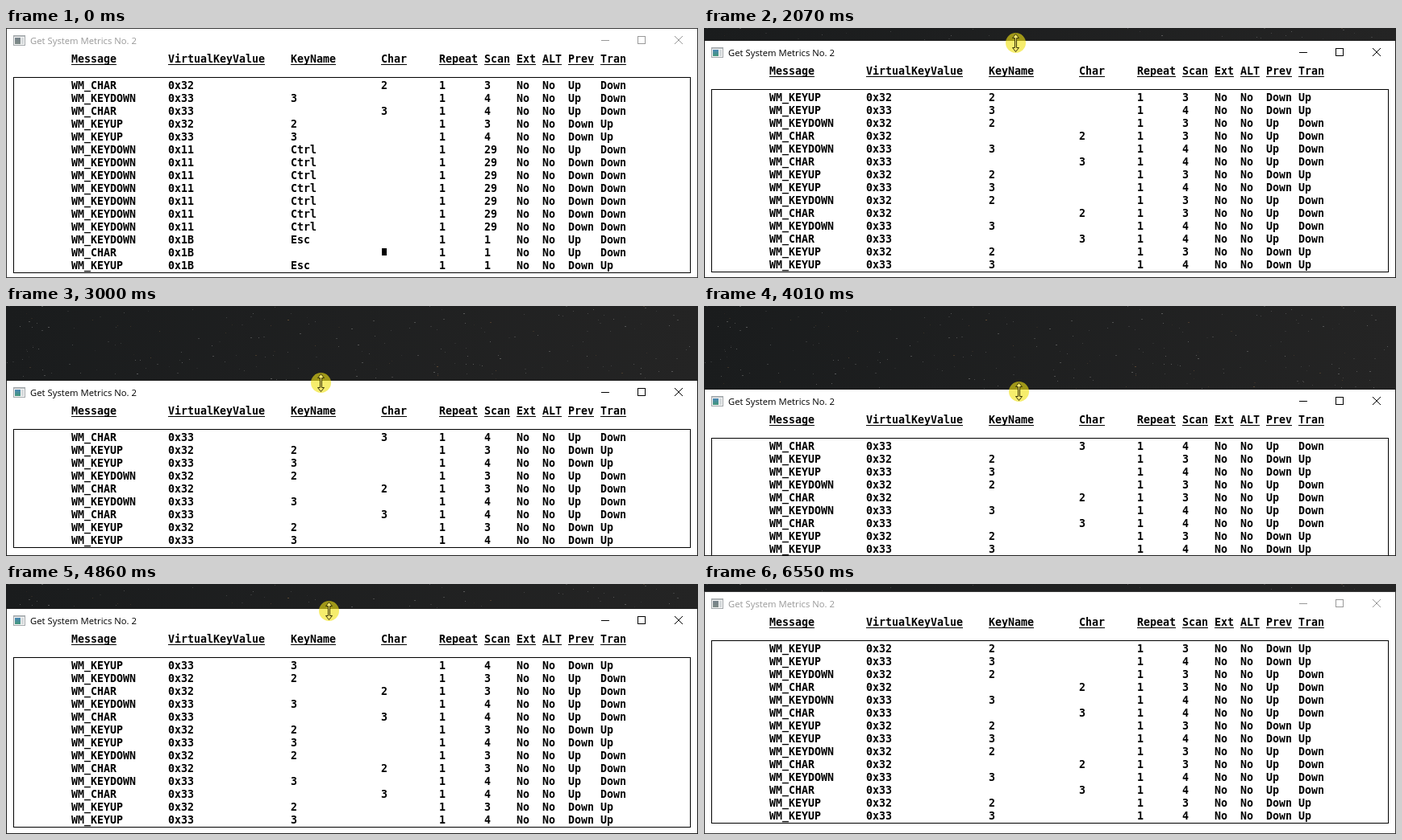
An HTML page with a canvas for the animation above (6.63 s loop, 858x311 px).

```html
<!DOCTYPE html>
<html lang="en">
<head>
<meta charset="utf-8">
<title>Key message viewer</title>
<style>
  html, body { margin: 0; width: 100%; height: 100%; overflow: hidden; background: #1e1f20; }
  canvas { display: block; }
</style>
</head>
<body>
<canvas id="stage" width="858" height="311"></canvas>
<script>
const W = 858, H = 311, LOOP = 6630;
const ctx = document.getElementById('stage').getContext('2d');
const MONO = 'bold 13.29px "DejaVu Sans Mono", monospace';
const UI = '11.3px "Open Sans", sans-serif';

// Message log: d = key down, r = auto-repeat, c = char, u = key up
const KEYS = {
  1: { code: '0x31', name: '1', scan: 2 },
  2: { code: '0x32', name: '2', scan: 3 },
  3: { code: '0x33', name: '3', scan: 4 },
  C: { code: '0x11', name: 'Ctrl', scan: 29 },
  E: { code: '0x1B', name: 'Esc', scan: 1 }
};
const KINDS = {
  d: ['WM_KEYDOWN', 'Up', 'Down'],
  r: ['WM_KEYDOWN', 'Down', 'Down'],
  c: ['WM_CHAR', 'Up', 'Down'],
  u: ['WM_KEYUP', 'Down', 'Up']
};
const LOG = [
  [0, 'c2 d3 c3 u2 u3 dC rC rC rC rC rC rC dE cE uE'],
  [460, 'd1 c1'], [540, 'u1 d3 c3'], [620, 'u3'], [700, 'd2 c2'], [770, 'd1 c1'],
  [940, 'u1'], [1010, 'd3 c3'], [1080, 'u2'], [1160, 'u3'], [1230, 'd2 c2'],
  [1390, 'd3 c3'], [1460, 'u2'], [1540, 'u3'], [1620, 'd2 c2'], [1690, 'd3 c3'],
  [1770, 'u2 u3']
].flatMap(([time, list]) => list.split(' ').map(item => ({ time, item })));

// Header columns: label and position in characters
const COLUMNS = [
  ['Message', 0], ['VirtualKeyValue', 15], ['KeyName', 34], ['Char', 48], ['Repeat', 57],
  ['Scan', 64], ['Ext', 69], ['ALT', 73], ['Prev', 77], ['Tran', 82]
];
const columnX = i => 81 + COLUMNS[i][1] * 8;

// Poses: [time, window top, cursor, x, y]
const POSES = [
  [0, 0, '', 0, 0],
  [70, 0, 'arrow', 376, 143],
  [140, 0, 'arrow', 339, 104],
  [310, 0, 'arrow', 339, 107],
  [1770, 0, 'size', 386, 3]
];
function drag(start, end, x0, x1, tops) {
  const last = tops.length - 1;
  tops.forEach((top, i) => {
    const k = i / last;
    const time = Math.floor((start + (end - start) * k) / 10) * 10;
    POSES.push([time, top, 'drag', Math.round(x0 + (x1 - x0) * k), top + 3]);
  });
}
drag(1920, 2540, 386, 387, [3, 8, 15, 23, 32, 42, 52, 61, 71]);
drag(2610, 3000, 388, 390, [75, 79, 83, 87, 90, 92]);
drag(3150, 3380, 390, 390, [95, 99, 103, 106]);
drag(4010, 4310, 390, 388, [103, 96, 88, 80, 71]);
drag(4400, 4630, 389, 394, [63, 55, 48, 43]);
drag(4720, 5090, 398, 404, [39, 35, 30, 24, 18, 13]);
drag(5270, 5400, 404, 405, [11, 10, 9]);
POSES[POSES.length - 1][2] = 'size';
[[405, 30], [425, 80], [445, 140], [462, 210], [478, 285]].forEach(([x, y], i) =>
  POSES.push([5710 + i * 77, 9, 'arrow', x, y]));
POSES.push([6090, 9, '', 0, 0]);

function rect(color, x, y, w, h) {
  ctx.fillStyle = color;
  ctx.fillRect(x, y, w, h);
}

function frame(color, x, y, w, h) {
  ctx.strokeStyle = color;
  ctx.lineWidth = 1;
  ctx.strokeRect(x + .5, y + .5, w - 1, h - 1);
}

function polygon(points, fill, stroke) {
  ctx.beginPath();
  points.forEach(([x, y]) => ctx.lineTo(x, y));
  ctx.closePath();
  ctx.fillStyle = fill;
  ctx.strokeStyle = stroke;
  ctx.lineWidth = 1;
  ctx.fill();
  ctx.stroke();
}

function drawSky() {
  const sky = ctx.createLinearGradient(0, 0, W, 60);
  sky.addColorStop(0, '#1a1c1d');
  sky.addColorStop(1, '#242424');
  rect(sky, 0, 0, W, H);
  let seed = 7;
  const random = () => (seed = seed * 16807 % 2147483647) / 2147483647;
  for (let i = 0; i < 260; i++) {
    const x = Math.floor(random() * W), y = Math.floor(random() * 115);
    const color = random() < .15 ? '150,110,70' : '150,150,150';
    rect(`rgba(${color},${.1 + random() * .4})`, x, y, 1 + (random() < .3), 1);
  }
}

function drawTitleBar(active) {
  const ink = active ? '#000' : '#999';
  rect('#f6f6f6', 9, 9, 15, 13);
  frame('#a3a8ab', 9, 9, 15, 13);
  rect('#b9bec1', 10, 10, 13, 1);
  const pane = ctx.createLinearGradient(0, 12, 0, 20);
  pane.addColorStop(0, active ? '#4a86b4' : '#76828a');
  pane.addColorStop(1, active ? '#43977a' : '#7d8a86');
  rect(pane, 11, 12, 7, 8);
  rect('#d5d9db', 19, 12, 3, 8);

  ctx.font = UI;
  ctx.fillStyle = ink;
  ctx.fillText('Get System Metrics No. 2', 30, 20);

  rect(ink, 738, 15, 10, 1);
  frame(ink, 783, 10, 10, 10);
  ctx.beginPath();
  ctx.moveTo(829, 10); ctx.lineTo(839, 20);
  ctx.moveTo(839, 10); ctx.lineTo(829, 20);
  ctx.strokeStyle = ink;
  ctx.stroke();
}

function drawRow(item, y) {
  const key = KEYS[item[1]], [message, prev, tran] = KINDS[item[0]];
  const isChar = item[0] === 'c';
  const block = isChar && item[1] === 'E';
  const cells = [message, key.code, isChar ? '' : key.name, isChar && !block ? key.name : '',
    '1', key.scan, 'No', 'No', prev, tran];
  ctx.fillStyle = '#000';
  cells.forEach((cell, i) => ctx.fillText(cell, columnX(i), y + 12));
  if (block) ctx.fillRect(columnX(3) + 1, y + 2, 6, 9);
}

function drawWindow(top, active, time) {
  ctx.save();
  ctx.translate(0, top);
  rect('#fff', 0, 0, W, H - top);
  drawTitleBar(active);

  ctx.font = MONO;
  ctx.fillStyle = '#000';
  COLUMNS.forEach(([label], i) => {
    ctx.fillText(label, columnX(i), 43);
    ctx.fillRect(columnX(i), 45, label.length * 8, 1);
  });

  // The list holds whole rows only and shows the newest ones
  const count = Math.floor((247 - top) / 16);
  const rows = LOG.filter(entry => entry.time <= time).slice(-count);
  frame('#000', 9, 61, 840, count * 16 + 4);
  rows.forEach((entry, i) => drawRow(entry.item, 64 + i * 16));

  frame(active ? '#1f1f1f' : '#383838', 0, 0, W, H - top);
  ctx.restore();
}

function drawCursor(kind, x, y) {
  if (!kind) return;
  ctx.save();
  ctx.translate(x + .5, y + .5);
  if (kind === 'arrow') {
    polygon([[0, 0], [0, 16], [4, 12.5], [6.5, 18], [9, 17], [6.5, 11.5], [11, 11.5]], '#fff', '#000');
  } else {
    if (kind === 'drag') {
      ctx.beginPath();
      ctx.arc(0, 0, 12.5, 0, Math.PI * 2);
      ctx.fillStyle = 'rgba(240,226,20,.62)';
      ctx.fill();
    }
    const half = [[-1, -6], [-4, -6], [0, -11], [4, -6], [1, -6]];
    const flipped = half.map(([px, py]) => [-px, -py]);
    polygon([...half, ...flipped], kind === 'drag' ? '#f6e970' : '#fff', '#3a3608');
  }
  ctx.restore();
}

function draw(time) {
  const [, top, cursor, x, y] = POSES.findLast(pose => pose[0] <= time);
  const active = time >= 310 && time < 6550;
  drawSky();
  drawWindow(top, active, time);
  drawCursor(cursor, x, y);
}

const start = performance.now();
function tick() {
  draw((performance.now() - start) % LOOP);
  requestAnimationFrame(tick);
}
tick();
</script>
</body>
</html>
```
